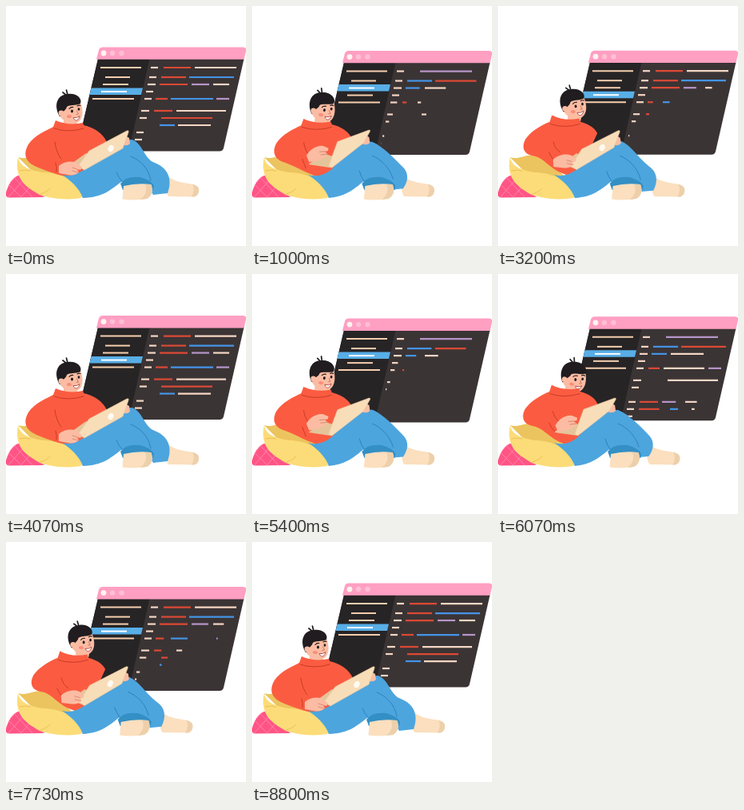
Animation, 300 px wide and 300 px high, one loop 8870 ms. Source, as an HTML page:

```html
<!DOCTYPE html>
<html lang="en">
<head>
<meta charset="utf-8">
<title>Coding on a cushion</title>
<style>
  html, body { margin: 0; width: 100%; height: 100%; overflow: hidden; background: #fff; }
  svg { display: block; width: 100%; height: 100%; }
  .line { fill: none; stroke-linecap: round; stroke-linejoin: round; }
  .skin { fill: #fbbca3; }
  .sock { fill: #fbdfbe; }
  .toe { fill: #edd0ab; }
</style>
</head>
<body>
<svg viewBox="0 0 300 300">
  <defs>
    <clipPath id="pinkClip"><path d="M0 233 C4 219 12 209 24 211 L48 239 L4 239.500 Q-1 239 0 233Z"/></clipPath>
  </defs>

  <g id="panel">
    <path fill="#3b3435" d="M115 66 L297.500 66 L272 177.500 Q271 181.500 267 181.500 L88 181.500Z"/>
    <path fill="#272426" d="M115 66 L179.500 66 L153.500 181.500 L88 181.500Z"/>
    <path fill="#ff9fc2" d="M121 51.500 H296 Q301 51.500 300 56 L297.500 66.800 H113 L116 55 Q117 51.500 121 51.500Z"/>
    <circle cx="122" cy="59" r="3.400" fill="#fff3ef"/>
    <circle cx="133" cy="59" r="3.200" fill="#ffbfd3"/>
    <circle cx="144.500" cy="59" r="3.200" fill="#ffbfd3"/>
    <path id="bar" fill="#58aee6" d="M106.500 102.500 H171 L169 111 H104.500Z"/>
    <g id="menu" fill="none" stroke="#f5cfae" stroke-width="2"></g>
    <g id="code" fill="none" stroke-width="2.200"></g>
  </g>

  <g clip-path="url(#pinkClip)">
    <rect y="205" width="60" height="40" fill="#ff5585"/>
    <path class="line" stroke="#ff8db5" stroke-width=".8"
      d="M2 222 L22 242 M10 214 L36 242 M20 210 L48 240 M2 240 L30 208 M16 242 L38 217 M-4 232 L18 206"/>
  </g>
  <path fill="#ecc45f" d="M15 189 C26 193 34 184 46 187 C62 192 84 210 92 226 L50 224Z"/>
  <path fill="#fcdc78" d="M15 189 C18 202 30 205 46 208 C66 208 90 218 97 233 Q99 240 90 240.500 C72 243 54 240 42 236 C30 229 18 222 15 208 Q13 200 15 189Z"/>
  <path class="line" stroke="#e9bd55" stroke-width=".9" d="M17 206 Q24 204 30 206 M43 235 Q52 232 55 228"/>

  <path id="sweater" fill="#fb5c41"/>

  <g id="head">
    <path class="skin" d="M72 136 L90 140 L88 150 Q80 153 72 149Z"/>
    <path class="skin" d="M66 126 C72 116 90 115 94 123 C97 133 96 142 89 146 C80 149 71 144 67 137Z"/>
    <path fill="#201c1f" d="M67 138 C59 124 64 111 77 110 C87 108 96 115 93 122 C86 125 80 123 76 126 C75 131 71 130 70.500 136Z"/>
    <circle cx="69" cy="134" r="3.400" class="skin"/>
    <path class="line" stroke="#201c1f" stroke-width="1.700" d="M76 112 L71 108 M77 111 L75.500 105"/>
    <path class="line" stroke="#201c1f" stroke-width="1.100" d="M79 128.500 Q81 126 84 126.500 M89 125 Q91 123.500 93 124.500"/>
    <g id="eyesOpen" fill="#201c1f">
      <ellipse cx="82.500" cy="131.500" rx="1.500" ry="1.900"/>
      <ellipse cx="91" cy="129" rx="1.400" ry="1.800"/>
    </g>
    <path id="eyesShut" class="line" stroke="#201c1f" stroke-width="1" d="M80 132 Q82.500 130 85 132 M89 130 Q91 128 93 129.500"/>
    <path class="line" stroke="#d17c66" stroke-width="1" d="M88.500 131 L90.500 135 L88 135.500"/>
    <ellipse cx="79" cy="138" rx="3" ry="2" fill="#f98f7c"/>
    <path fill="#fff" stroke="#a9423c" stroke-width=".8" d="M84 139.500 Q89 140.500 92 137.500 Q91 143 87 143 Q85 142 84 139.500Z"/>
  </g>
  <path id="collar" fill="#fb5c41"/>
  <path id="folds" class="line" stroke="#c83c26" stroke-width="1"/>

  <g id="farFoot">
    <path class="sock" d="M204 214 C216 223 232 220 240 226 Q243 234 236 238.500 L203 238 Q197 228 204 214Z"/>
    <path class="toe" d="M233 222.500 Q245 226 239.500 236 Q237 239 232 238.500 Q237 230 233 222.500Z"/>
  </g>
  <path id="legs" fill="#4da5de"/>
  <path id="crease" class="line" stroke="#2f82bd" stroke-width="1"/>
  <g id="nearFoot">
    <path fill="#338fc4" d="M143 222 Q150 212 168 214 Q182 218 185 225 L184 230 L146 230Z"/>
    <path class="sock" d="M147 225 Q164 221 181 223 Q186 235 176 241 Q160 243.500 145.500 241.500Z"/>
    <path class="toe" d="M174 223 L181.500 223 Q186 235 176 241 L168 242 Q178 234 174 223Z"/>
  </g>

  <g id="gripHand"><path class="skin" d="M-6 -4 Q0 -8 5 -4 L6 3 Q2 7 -4 4Z"/></g>
  <path id="base" fill="#e5c49b"/>
  <path id="lid" fill="#f8ddb9" stroke="#e8c69d" stroke-width=".6"/>
  <ellipse id="badge" rx="3.400" ry="4.400" fill="#fffaf2"/>
  <g id="typeHand">
    <path class="skin" d="M-15 -3 C-8 -9 3 -10 9 -6 L14 -1 L12 2 L8 1 L10 5 Q4 10 -4 8 L-15 6Z"/>
    <path class="line" stroke="#d1816a" stroke-width=".8" d="M8 1 L2 -1 M9 5 L2 3"/>
  </g>
</svg>

<script>
const LOOP = 8870, CYCLE = LOOP / 2, SWITCH = 2100, CLEAR = 220, STEP = LOOP / 133;
const $ = id => document.getElementById(id);
const clamp = v => Math.min(1, Math.max(0, v));
const ease = v => (1 - Math.cos(Math.PI * clamp(v))) / 2;
const lerp = (a, b, k) => a + (b - a) * k;

const colors = { w: '#f4d6c3', r: '#dc4935', b: '#4594e8', l: '#b795c8' };
const sources = [
  `77 w181-190 l210-275|89 w179-188 b194-225 r229-285|98 w177-187 b192-211 w216-257
   |107 w175-184|116 w173-182 r188-202 w207-258 l263-279|131 w169-179 w212-275
   |140 w167-176|158 w163-172 r177-200 l205-229 w234-268|167 w161-170 r176-211 b215-238 w242-267|176 w158-168`,
  `77 w181-190 r197-231 w236-288|89 w179-188 r194-225 b229-285|98 w177-187 r192-227 l232-254 w259-279
   |107 w175-184|116 w173-182 r187-202 b206-259 l263-279|131 w169-179 r185-208 w213-275
   |140 w167-176 r194-258|149 b192-211 w215-256|158 w163-172|167 w161-170`
];

function addLine(parent, stroke) {
  const el = document.createElementNS('http://www.w3.org/2000/svg', 'path');
  if (stroke) el.setAttribute('stroke', stroke);
  return parent.appendChild(el);
}

// Short row markers run ahead of the longer code segments.
const listings = sources.map(text => text.split('|').flatMap((row, i) => {
  const [y, ...parts] = row.trim().split(' ');
  return parts.map((part, j) => {
    const [from, to] = part.slice(1).split('-').map(Number);
    const marker = to - from < 11;
    return {
      el: addLine($('code'), colors[part[0]]), y, from, to,
      start: marker ? 450 + 68 * i : 235 + 120 * i + 125 * j,
      length: marker ? 300 : 430
    };
  });
}));

const menu = ['M118 77H169', 'M124 89H155', 'M121 98H153', 'M119 107H151', 'M108 116H160'].map(d => {
  const el = addLine($('menu'));
  el.setAttribute('d', d);
  return el;
});

// Each shape: sitting up, then reclined.
const torso = {
  sweater: [
    'M66 146 C54 150 41 159 35 168 C30 178 33 187 46 188 C60 190 66 210 92 214 L108 196 L124 160 C120 153 112 148 101 146Z',
    'M61 150 C50 156 36 161 28 173 C21 185 24 195 38 201 C54 208 74 214 92 216 L108 200 L126 170 C121 159 110 152 97 149Z'],
  collar: [
    'M68 138 Q84 146 102 142 L105 149 Q84 156 64 150Z',
    'M62 143 Q78 150 96 146 L99 153 Q80 160 58 154Z'],
  folds: [
    'M66 149 Q84 155 103 149 M70 172 Q72 180 79 184 M64 184 Q68 192 74 197',
    'M60 153 Q78 159 97 153 M61 170 Q63 184 69 191 M62 196 Q64 202 63 207']
};
const lower = {
  legs: [
    'M70 211 C86 216 100 206 106 196 C116 180 130 170 150 170 C164 176 178 190 190 203 C196 211 194 220 188 228 L176 229 C172 220 152 216 138 220 C126 230 116 238 96 240 C92 228 80 217 70 211Z',
    'M70 211 C90 216 100 200 120 190 C140 178 150 163 160 168 C171 174 174 192 186 196 C204 203 208 218 202 234 L184 236 C178 224 160 216 144 220 C130 230 122 239 96 240 C92 228 80 217 70 211Z'],
  crease: [
    'M150 187 C162 192 172 203 176 216 M134 206 Q136 214 140 219',
    'M156 188 C168 193 178 202 181 218 M138 208 Q141 215 145 219']
};
const laptop = {
  base: ['M70 198 L88 184 L107 190 L99 202Z', 'M82 197 L100 184 L112 192 L98 205Z'],
  lid: ['M107 169 L146 155 Q148 155 147 157 L139 171 L100 202 L96 200Z',
        'M104 181 L151 156 Q154 155 153 158 L146 178 L98 205 L90 200Z']
};

function morph(group, k) {
  for (const [id, [a, b]] of Object.entries(group)) {
    const ends = b.match(/[\d.]+/g);
    let i = 0;
    $(id).setAttribute('d', a.replace(/[\d.]+/g, n => lerp(+n, +ends[i++], k).toFixed(2)));
  }
}

// time, leg recline, torso recline, lid, head x, y, tilt, torso lift, typing hand x, y
const poses = [
  [0, 1, 1, 1, 0, 0, 0, 0, 81, 203],
  [965, .06, .6, .05, 7, -2, 7, 0, 83, 184],
  [2000, 0, 0, 0, 15, 0, 13, 0, 88, 187],
  [2295, .1, .6, .05, 8, -1, 7, 0, 82, 185],
  [3200, .45, .1, .85, 15, -6, -2, -2, 84, 194],
  [4070, 1, 1, 1, 0, 0, 0, 0, 81, 203],
  [CYCLE, 1, 1, 1, 0, 0, 0, 0, 81, 203]
];

function poseAt(t) {
  const n = poses.findIndex(p => p[0] > t), a = poses[n - 1], b = poses[n];
  const k = ease((t - a[0]) / (b[0] - a[0]));
  return a.map((v, i) => lerp(v, b[i], k)).slice(1);
}

const move = (id, x, y, extra = '') => $(id).setAttribute('transform', `translate(${x} ${y}) ${extra}`);

function drawPanel(t) {
  const half = t < SWITCH ? 0 : 1, u = t - half * SWITCH;
  move('panel', 0, 4.7 * Math.abs(Math.sin(2 * Math.PI * t / CYCLE)) ** 3);

  const k = ease((u - CLEAR) / 200), row = half ? 2 + k : 3 - k;
  move('bar', (3 - row) * 2, (row - 3) * 9);
  menu.forEach((el, i) => el.setAttribute('stroke', i === Math.round(row) ? '#fff' : '#f5cfae'));

  const typing = u > CLEAR;
  listings.forEach((list, n) => list.forEach(s => {
    const shown = n !== half ? +!typing : typing ? clamp((u - s.start) / s.length) : 0;
    s.el.setAttribute('d', shown ? `M${s.from} ${s.y}H${lerp(s.from, s.to, shown)}` : '');
  }));
}

function drawPerson(t) {
  const [legs, lean, lid, hx, hy, tilt, lift, handX, handY] = poseAt(t);
  morph(torso, lean);
  morph(lower, legs);
  morph(laptop, lid);
  for (const id of Object.keys(torso)) move(id, 0, lift);
  move('head', hx, hy, `rotate(${tilt} 78 140)`);
  move('nearFoot', -6 * (1 - legs), 0);
  move('farFoot', -14 * (1 - legs), 0);
  move('typeHand', handX, handY, `rotate(${-24 * (1 - lid)})`);
  move('gripHand', lerp(141, 149, lid), lerp(168, 169, lid));
  move('badge', lerp(126, 131, lid), lerp(172, 178, lid), 'rotate(25)');
  $('badge').setAttribute('opacity', clamp(lid * 2 - .5));
  const blink = t > 2220 && t < 2370;
  $('eyesOpen').setAttribute('opacity', blink ? 0 : 1);
  $('eyesShut').setAttribute('opacity', blink ? 1 : 0);
}

const origin = performance.now();
function frame() {
  const t = Math.floor((performance.now() - origin) / STEP) * STEP % CYCLE;
  drawPanel(t);
  drawPerson(t);
  requestAnimationFrame(frame);
}
frame();
</script>
</body>
</html>
```
